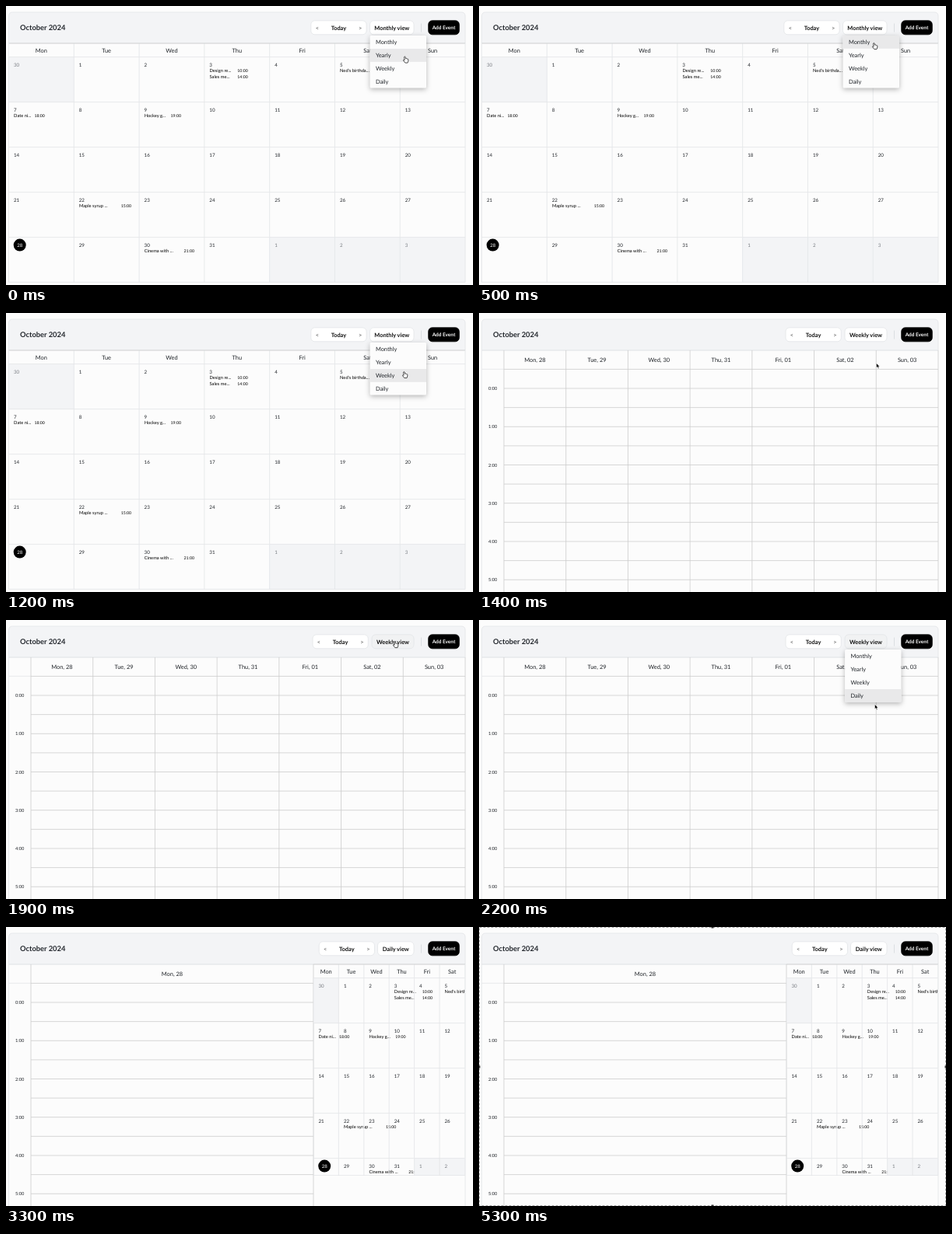
Write an HTML page that moves like this. It is 600 px wide and 359 px high and loops after 6500 ms.

```html
<!DOCTYPE html>
<html lang="en">
<head>
<meta charset="utf-8">
<title>Calendar views</title>
<style>
html, body { margin: 0; width: 100%; height: 100%; overflow: hidden; background: #fcfcfc; }
svg { display: block; width: 600px; height: 359px; }
text { font-family: Lato, "Open Sans", sans-serif; fill: #1f2328; text-rendering: geometricPrecision; }
.bold { font-weight: 700; fill: #111; }
.menu { filter: drop-shadow(0 2px 3px rgba(0, 0, 0, .28)); }
</style>
</head>
<body>
<svg id="stage" viewBox="0 0 600 359"></svg>
<script>
const NS = "http://www.w3.org/2000/svg";
const stage = document.getElementById("stage");
const PAGE = "#fcfcfc", PALE = "#f3f4f6", EDGE = "#e3e5e8", LINE = "#cdcdcd";
const DAYS = ["Mon", "Tue", "Wed", "Thu", "Fri", "Sat", "Sun"];
const ITEMS = ["Monthly", "Yearly", "Weekly", "Daily"];
const LOOP = 6500, TICK = 100, MENU_TOP = 38, ROW = 17;

// day: list of [title, time, time offset in the cell]
const EVENTS = {
  3: [["Design re...", "10:00", 42.5], ["Sales me...", "14:00", 42.5]],
  5: [["Ned's birthda...", "", 0]],
  7: [["Date ni...", "18:00", 33]],
  9: [["Hockey g...", "19:00", 40.5]],
  22: [["Maple syrup ...", "15:00", 60.5]],
  30: [["Cinema with ...", "21:00", 57.5]]
};

function add(parent, tag, attrs) {
  const el = document.createElementNS(NS, tag);
  for (const key in attrs) el.setAttribute(key, attrs[key]);
  return parent.appendChild(el);
}
const group = (parent, attrs) => add(parent, "g", attrs);
const rect = (p, x, y, width, height, fill, more) =>
  add(p, "rect", { x, y, width, height, fill, ...more });
const line = (p, x1, y1, x2, y2, stroke = LINE, more) =>
  add(p, "line", { x1, y1, x2, y2, stroke, "stroke-width": .8, ...more });
function label(p, str, x, mid, size, more) {
  const el = add(p, "text", { x, y: mid + size * .36, "font-size": size, ...more });
  el.textContent = str;
  return el;
}
const centred = (p, str, x, mid, size, more) =>
  label(p, str, x, mid, size, { "text-anchor": "middle", ...more });
const button = (p, x, width, fill = "#fff", stroke = EDGE) =>
  rect(p, x, 18.8, width, 18, fill, { rx: 5, stroke, "stroke-width": .8 });

function frame() {
  const g = group(stage);
  add(g, "path", { d: "M3.5 48V13q0-5 5-5H585q5 0 5 5V48Z", fill: PALE, stroke: EDGE, "stroke-width": .8 });
  label(g, "October 2024", 18, 28, 9.35, { class: "bold", style: "fill:#24282e" });
  line(g, 533.5, 22.5, 533.5, 33.5, "#d5d8dc");
  button(g, 542.7, 39.6, "#000", "#000");
  centred(g, "Add Event", 562.5, 28, 6.45, { class: "bold", style: "fill:#fff" });
}

function toolbar(p, left, viewLeft, title) {
  button(p, left, 71.3);
  centred(p, "<", left + 8, 28, 7.4, { style: "fill:#555" });
  centred(p, "Today", left + 35.6, 28, 7.4, { class: "bold" });
  centred(p, ">", left + 63.3, 28, 7.4, { style: "fill:#555" });
  const face = button(p, viewLeft, 524 - viewLeft);
  centred(p, title, (viewLeft + 524) / 2, 28, 7.4, { class: "bold" });
  return face;
}

function month(p, left, colW, cols, bottom) {
  const top = 65.6, rowH = 58, right = 590;
  DAYS.slice(0, cols).forEach((day, i) => {
    centred(p, day, left + (i + .5) * colW, 57, 7.4);
    if (i) line(p, left + i * colW, 48, left + i * colW, top, EDGE);
  });
  for (let i = 0; i < 35; i++) {
    const col = i % 7;
    if (col >= cols) continue;
    const off = i < 1 || i > 31;
    const day = i < 1 ? 30 : i > 31 ? i - 31 : i;
    const x = left + col * colW, y = top + Math.floor(i / 7) * rowH;
    if (off) rect(p, x, y, colW, rowH, PALE);
    line(p, x, y, x, y + rowH, EDGE);
    line(p, x, y, x + colW, y, EDGE);
    const today = day === 28 && !off;
    if (today) {
      add(p, "circle", { cx: x + 14.2, cy: y + 10, r: 8, fill: "#000" });
      centred(p, day, x + 14.2, y + 10.2, 6.1, { style: "fill:#fff" });
    } else {
      label(p, day, x + 6.5, y + 10.4, 6.2, off ? { style: "fill:#777b80" } : {});
    }
    if (!off) (EVENTS[day] || []).forEach(([title, time, dx], n) => {
      label(p, title, x + 6.6, y + 17.8 + n * 7.6, 5.75, { style: "fill:#000" });
      label(p, time, x + dx, y + 17.8 + n * 7.6, 5.2, { style: "fill:#000" });
    });
  }
  line(p, left, 48, right, 48);
  line(p, left, bottom, right, bottom, EDGE);
  line(p, right, 48, right, bottom, EDGE);
}

function hours(p, right, heads) {
  const left = 32, colW = (right - left) / heads.length;
  line(p, 3.5, 48, right, 48, EDGE);
  line(p, 3.5, 48, 3.5, 359, EDGE);
  line(p, 3.5, 72.3, left, 72.3, EDGE);
  for (let i = 0; i < 12; i++) {
    const y = 72.4 + i * 24.62;
    line(p, left, y, right, y);
    if (i % 2) centred(p, (i - 1) / 2 + ":00", 17.7, y, 5.7);
  }
  heads.forEach((head, i) => {
    const x = left + i * colW;
    line(p, x, 48, x, 359);
    centred(p, head, x + colW / 2, 60.2, 7.45);
  });
  line(p, right, 48, right, 359);
}

frame();

const monthly = group(stage), weekly = group(stage), daily = group(stage);

month(monthly, 3.5, 83.79, 7, 355.4);
line(monthly, 3.5, 48, 3.5, 355.4, EDGE);
toolbar(monthly, 391.8, 467.5, "Monthly view");

const dates = ["28", "29", "30", "31", "01", "02", "03"];
hours(weekly, 590, DAYS.map((day, i) => day + ", " + dates[i]));
const weekFace = toolbar(weekly, 394, 470, "Weekly view");

hours(daily, 395, ["Mon, 28"]);
const clip = add(add(stage, "clipPath", { id: "side" }), "rect", { x: 394.5, y: 47, width: 195.5, height: 273 });
month(group(daily, { "clip-path": "url(#side)" }), 395, 32.4, 6, 319.6);
line(daily, 590, 48, 590, 359, EDGE);
toolbar(daily, 402.2, 477.5, "Daily view");

const menu = group(stage, { class: "menu" });
rect(menu, 0, MENU_TOP, 72.4, 67.6, PAGE, { rx: 1.5 });
const hover = rect(menu, 0, 0, 72.4, ROW - .2, "#e9e9ea");
ITEMS.forEach((item, i) => label(menu, item, 7.3, MENU_TOP + 8.3 + i * ROW, 7.4));

const pointer = group(stage);
const arrow = add(pointer, "path", {
  d: "M0 0V6L1.4 4.8 2.4 7.1 3.5 6.6 2.5 4.4H4.3Z",
  fill: "#000", stroke: "#fff", "stroke-width": .5
});
const hand = add(pointer, "path", {
  d: "M1.6 1Q2.4 0 3.1 1L3.6 3.2Q5 2.8 5.4 3.5 6.8 3.4 6.9 4.8L6.6 7 6 8.6H2.8L.5 5.6Q.4 4.6 1.4 4.9L2.1 5.3Z",
  fill: "#fff", stroke: "#222", "stroke-width": .8, "stroke-linejoin": "round"
});

// capture outline shown at the end of the loop
const outline = group(stage);
rect(outline, .5, .5, 599, 358, "none", { stroke: "#8a8a8a", "stroke-width": .8, "stroke-dasharray": "3 2" });
[[300, 0], [0, 180], [600, 180], [300, 359]].forEach(([x, y]) =>
  rect(outline, x - 1.5, y - 1.5, 3, 3, "#333"));

// pointer path: time, x, y
const PATH = [
  [0, 510, 64.5], [300, 508, 57], [500, 505, 47], [700, 504, 45], [900, 506, 51.5],
  [1100, 508, 66], [1200, 509, 75], [1300, 509, 75], [1400, 510.5, 64.5],
  [1700, 500, 32], [1900, 497, 27], [2000, 497, 27], [2100, 503, 92],
  [2200, 508.5, 108.5], [2400, 512, 128], [2600, 513, 112], [2700, 511, 98.5],
  [2900, 511, 98.5], [3000, 512, 110], [3200, 530, 300]
];

function place(t) {
  const next = PATH.findIndex(key => key[0] > t);
  if (next < 0) return PATH[PATH.length - 1].slice(1);
  if (!next) return PATH[0].slice(1);
  const a = PATH[next - 1], b = PATH[next], k = (t - a[0]) / (b[0] - a[0]);
  return [a[1] + (b[1] - a[1]) * k, a[2] + (b[2] - a[2]) * k];
}

function menuRow(y) {
  const row = Math.floor((y - MENU_TOP) / ROW);
  return row >= 0 && row < ITEMS.length ? row : -1;
}

const show = (el, on) => el.setAttribute("display", on ? "inline" : "none");

function draw(t) {
  const inMonth = t < 1400, inWeek = !inMonth && t < 3000;
  show(monthly, inMonth);
  show(weekly, inWeek);
  show(daily, t >= 3000);

  const [x, y] = place(t), before = place(t - TICK)[1];
  const open = inMonth || (inWeek && t >= 2100);
  const now = menuRow(y), last = menuRow(before);
  const row = now < 0 ? last : now;
  show(menu, open);
  menu.setAttribute("transform", `translate(${inMonth ? 467.6 : 470.1} 0)`);
  show(hover, row >= 0);
  hover.setAttribute("y", MENU_TOP + row * ROW);
  weekFace.setAttribute("fill", t >= 1700 && t < 2300 ? "#f1f2f3" : "#fff");

  const onItem = open && now >= 0 && last >= 0;
  const onButton = inWeek && y > 19 && y < 37;
  show(pointer, t < 3300);
  pointer.setAttribute("transform", `translate(${x} ${y})`);
  show(hand, onItem || onButton);
  show(arrow, !onItem && !onButton);
  show(outline, t >= 5300);
}

const start = performance.now();
function run() {
  const t = (performance.now() - start) % LOOP;
  draw(Math.floor(t / TICK) * TICK);
  requestAnimationFrame(run);
}
run();
</script>
</body>
</html>
```
